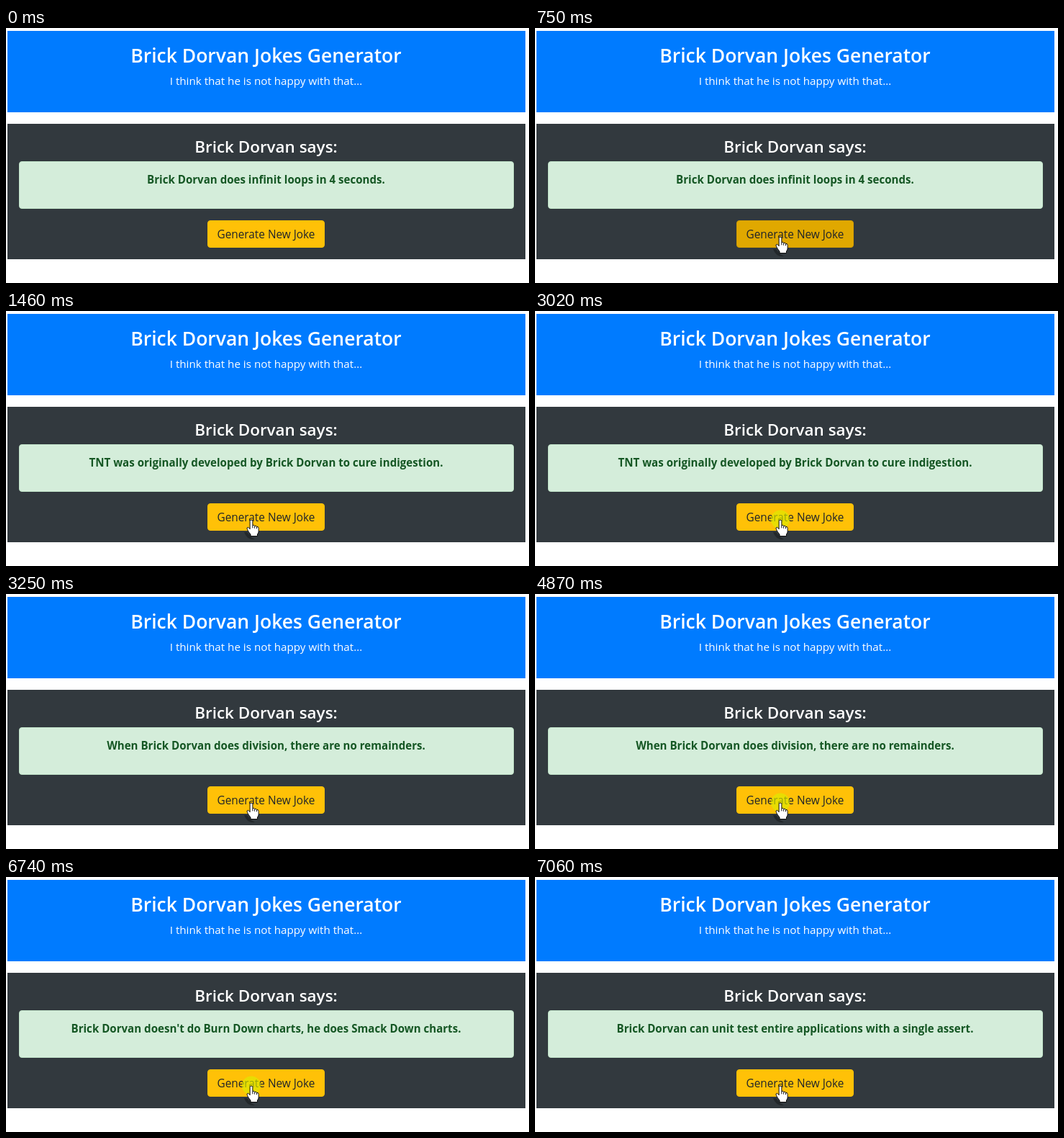
Recreate the animation shown at these times as an HTML page. Size 727 by 354 pixels, loop 8 s.

```html
<!DOCTYPE html>
<html lang="en">
<head>
<meta charset="utf-8">
<title>Jokes Generator</title>
<style>
  html, body { margin: 0; width: 100%; height: 100%; overflow: hidden; background: #fff; }
  svg { display: block; width: 100%; height: 100%; }
  text { font-family: "Open Sans", "Noto Sans", sans-serif; text-anchor: middle; fill: #fff; }
  .title { font-size: 26.5px; font-weight: 600; }
  .lead { font-size: 15.2px; }
  .heading { font-size: 22.45px; font-weight: 600; }
  #joke { font-size: 15.1px; font-weight: 700; fill: #155724; }
  .label { font-size: 15.36px; fill: #212529; }
</style>
</head>
<body>
<svg viewBox="0 0 727 354">
  <rect x="2" y="4" width="720" height="113" fill="#007bff"/>
  <text class="title" x="361.5" y="48">Brick Dorvan Jokes Generator</text>
  <text class="lead" x="361.5" y="79">I think that he is not happy with that...</text>

  <rect x="2" y="133" width="720" height="188" fill="#32393e"/>
  <text class="heading" x="361.5" y="173">Brick Dorvan says:</text>
  <rect x="18.5" y="185.5" width="687" height="65" rx="3.5" fill="#d4edda" stroke="#c3e6cb"/>
  <text id="joke" x="361.5" y="216"></text>

  <rect id="ring" x="277" y="264" width="169" height="44" rx="7" fill="#ffc107"/>
  <rect id="button" x="280.5" y="267.5" width="162" height="37" rx="3.5"/>
  <text class="label" x="361.5" y="292">Generate New Joke</text>

  <circle id="glow" cx="341" cy="289.5" r="13" fill="#dcec00" opacity=".65"/>
  <g id="cursor">
    <path d="M-10 17H-6L0 24L5 27Q-6 28 -10 17Z" fill="#22272a"/>
    <path id="arrow" d="M0 0V17L4 13.5L6.7 20L9.7 18.7L7 12.4H12.3Z" fill="#fff" stroke="#000"/>
    <g id="hand" transform="scale(.94)" stroke="#000" stroke-linejoin="round">
      <path d="M-2 1.8Q-2 0 0 0Q2 0 2 1.8V8Q4.5 7 5 9Q7.5 8 8 10Q10.5 9.5 10.8 12V17Q10.8 19.5 9 21V24H-1V21.5Q-4 18 -6 14Q-7.2 11 -5 11Q-3.5 11 -2 13.5Z"
            fill="#fff"/>
      <path d="M2 8V12M5 9V12.5M8 10V13" fill="none"/>
    </g>
  </g>
</svg>
<script>
const LOOP = 8000;
const NAME = "Brick Dorvan";
const JOKES = [
  `${NAME} does infinit loops in 4 seconds.`,
  `TNT was originally developed by ${NAME} to cure indigestion.`,
  `When ${NAME} does division, there are no remainders.`,
  `${NAME} doesn't do Burn Down charts, he does Smack Down charts.`,
  `${NAME} can unit test entire applications with a single assert.`
];
const NORMAL = [255, 193, 7], HOVER = [224, 168, 0], ACTIVE = [211, 158, 0];
const HOVER_EDGE = [211, 158, 0];

// Each row: start time and the properties that change from then on.
const STEPS = [
  [0, { joke: 0, hover: 0, press: 0, glow: false }],
  [443, { hover: 0.5 }],
  [520, { hover: 1 }],
  ...click([1220, 1300, 1380, 1460], 1),
  ...click([3020, 3100, 3250], 2),
  ...click([4870, 4950, 5100], 3),
  ...click([6740, 6810, 6890, 6970, 7060], 4)
];

function click(times, joke) {
  const last = times.length - 1;
  return times.map((time, i) => [time,
    i === 0 ? { glow: true } :
    i === last ? { joke, hover: 0, press: 0, glow: false } :
    { press: Math.min(1, i / 2) }
  ]);
}

const el = Object.fromEntries(
  ["joke", "ring", "button", "glow", "cursor", "arrow", "hand"]
    .map(id => [id, document.getElementById(id)]));
const mix = (a, b, k) => a.map((v, i) => v + (b[i] - v) * k);
const rgb = c => `rgb(${c.map(Math.round)})`;
const show = (node, on) => node.setAttribute("visibility", on ? "inherit" : "hidden");

function drawCursor(t) {
  const step = Math.min(6, Math.floor((t - 290) / (460 / 6) + 1e-6));
  const left = (1 - step / 6) ** 2;
  const x = 341 + 5 * left, y = 290 + 30 * left;
  show(el.cursor, t >= 290);
  el.cursor.setAttribute("transform", `translate(${x} ${y})`);
  show(el.arrow, y > 305);
  show(el.hand, y <= 305);
}

function draw(t) {
  const s = Object.assign({}, ...STEPS.filter(([time]) => time <= t).map(row => row[1]));
  if (el.joke.textContent !== JOKES[s.joke]) el.joke.textContent = JOKES[s.joke];
  el.button.setAttribute("fill", rgb(mix(mix(NORMAL, HOVER, s.hover), ACTIVE, s.press)));
  el.button.setAttribute("stroke", rgb(mix(NORMAL, HOVER_EDGE, Math.max(s.hover, s.press))));
  el.ring.setAttribute("opacity", s.press * 0.5);
  show(el.glow, s.glow);
  drawCursor(t);
  if (t < 290) [el.arrow, el.hand].forEach(node => show(node, false));
}

const start = performance.now();
function tick() {
  draw((performance.now() - start) % LOOP);
  requestAnimationFrame(tick);
}
tick();
</script>
</body>
</html>
```
